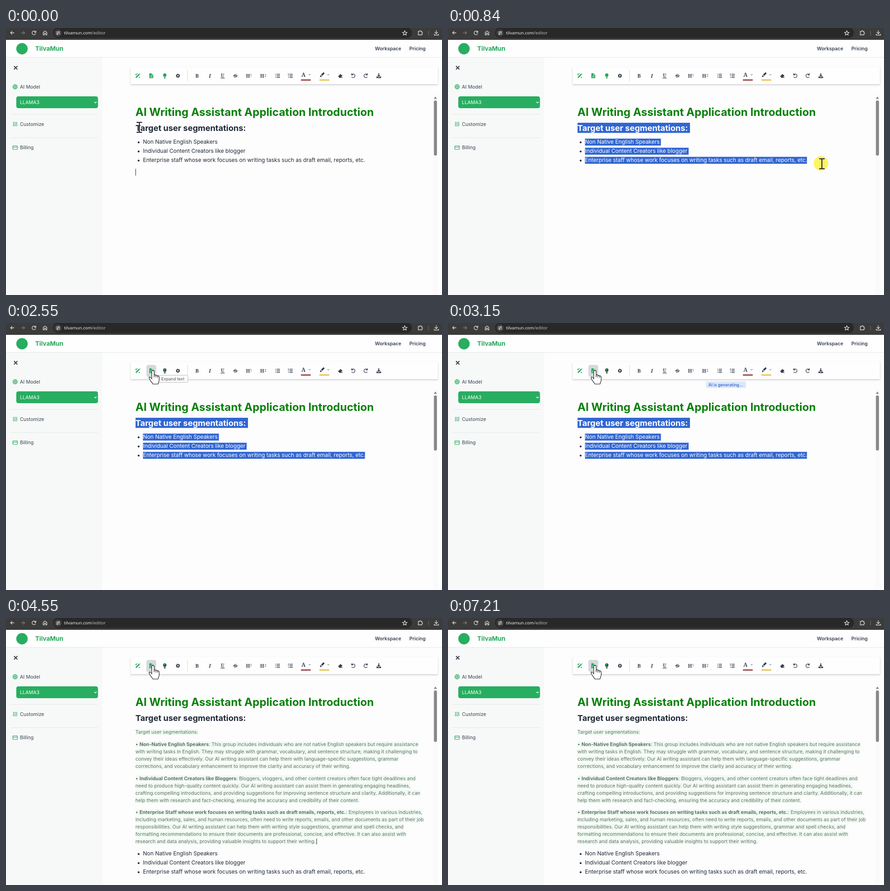
An HTML page for the animation above (7560 ms loop, 955 by 586 pixels).

```html
<!DOCTYPE html>
<html lang="en">
<head>
<meta charset="utf-8">
<title>Editor</title>
<style>
  html, body { margin: 0; width: 100%; height: 100%; overflow: hidden; background: #fdfdfd; }
  svg { display: block; font-family: Inter, sans-serif; }
  text { white-space: pre; }
  .line { fill: none; stroke: #374151; stroke-width: 1.3; }
  .light { fill: none; stroke: #d6d6d6; stroke-width: 1.3; }
  .green { fill: none; stroke: #27a85c; stroke-width: 1.2; }
  .serif { font: bold 11px "Noto Serif", serif; fill: #374151; text-anchor: middle; }
</style>
</head>
<body>
<svg id="stage" width="955" height="586" viewBox="0 0 955 586">
  <!-- browser bar -->
  <rect width="955" height="26" fill="#3b3b3b"/>
  <rect x="103" y="-1" width="786" height="23" rx="11.5" fill="#282828"/>
  <circle cx="114" cy="11" r="8" fill="#3f3f3f"/>
  <g class="light">
    <path d="M18 10.5H10M13.5 7L10 10.5L13.5 14"/>
    <path d="M33 10.5H41M37.5 7L41 10.5L37.5 14" style="stroke:#777"/>
    <path d="M64.5 8.5A4 4 0 1 0 65 12M65.500 6V9.500H62"/>
    <path d="M81.5 9.5L85.5 6.5L89.5 9.5V15H87V11.5H84V15H81.5Z"/>
    <path d="M110 9H114M116 13H118.5M112 13H110"/><circle cx="116" cy="9" r="1.3"/><circle cx="113" cy="13" r="1.3"/>
    <path d="M873.5 6L874.9 9.3L878.5 9.6L875.8 12L876.6 15.5L873.5 13.6L870.4 15.5L871.2 12L868.5 9.6L872.1 9.3Z"/>
    <path d="M903 7.5H906A1.5 1.5 0 0 1 909 7.5H911V10A1.5 1.5 0 0 1 911 13V15H903V12.5A1.5 1.5 0 0 0 903 10Z"/>
    <path d="M925.5 6V16" style="stroke:#666"/>
    <path d="M942.5 5V12M939 9L942.5 12.5L946 9M938 13V15.5H947.5V13"/>
  </g>
  <!-- header and sidebar -->
  <rect y="26" width="955" height="38.5" fill="#fefefe"/>
  <rect y="65" width="211" height="521" fill="#f7f9f8"/>
  <path d="M0 64.5H955M10 189.5H201M10 240.5H201" stroke="#e4e7e8"/>
  <circle cx="35" cy="45.5" r="12.5" fill="#27ae60"/>
  <path class="line" d="M17.5 83.5L25 91M25 83.5L17.5 91" style="stroke-width:2"/>
  <g class="green">
    <rect x="16.5" y="125.5" width="7" height="7" rx="1"/><rect x="18.8" y="127.8" width="2.4" height="2.4"/>
    <path d="M18 123.5V125M20 123.5V125M22 123.5V125M18 133V134.5M20 133V134.5M22 133V134.5M14.5 127H16M14.5 129H16M14.5 131H16M24 127H25.5M24 129H25.5M24 131H25.5"/>
    <path d="M16.5 206V211M16.5 213.5V216M20 206V208M20 210.5V216M23.5 206V212M23.5 214.5V216M14.8 212.5H18.2M18.3 209H21.7M21.8 213H25.2"/>
    <rect x="15" y="258.5" width="10" height="8" rx="1"/><path d="M15 261.5H25"/>
  </g>
  <rect x="22.5" y="150" width="179" height="26" rx="4.5" fill="#27ae60"/>
  <path d="M193.5 162L196 164.5L198.5 162" fill="none" stroke="#fff" stroke-width="1.3"/>
  <!-- toolbar -->
  <rect x="273" y="86" width="673" height="37.5" fill="#fefefe" style="filter:drop-shadow(0 1px 1px #0003) drop-shadow(0 2px 2px #0001)"/>
  <rect id="hover" x="307.5" y="92" width="21.5" height="26" rx="4" fill="#d5d9dd"/>
  <path d="M397.5 92V118" stroke="#d5d8dc"/>
  <path d="M284.5 109L292 101.5" stroke="#27a85c" stroke-width="2.6"/>
  <path class="green" d="M285 100V104M283 102H287M292 107V110M290.5 108.5H293.5M287.5 99V101M294 100L292.5 101.5"/>
  <path d="M314 99.5H319.5L322.5 102.5V110H314Z" fill="#27a85c"/>
  <path d="M316 105H320.5M316 107.5H320.5M319.5 99.5V102.5H322.5" stroke="#fff" stroke-width=".9" fill="none"/>
  <g id="bulb" fill="#27a85c"><path d="M345.5 107C343 104 344 99.5 347.8 99.5S352.5 104 350 107Z"/><rect x="345.8" y="108" width="4" height="2.5" rx="1"/></g>
  <circle cx="347.5" cy="102.5" r="1.8" fill="#27a85c"/>
  <circle cx="376.5" cy="104.8" r="2.6" fill="none" stroke="#374151" stroke-width="2.1"/>
  <circle cx="376.5" cy="104.8" r="3.9" fill="none" stroke="#374151" stroke-width="1.3" stroke-dasharray="2.05 2.034"/>
  <g class="serif">
    <text x="418.5" y="109">B</text><text x="446.5" y="109" font-style="italic">I</text>
    <text x="474.5" y="108" font-size="10">U</text><text x="502.5" y="109">S</text>
    <text x="530" y="109">H</text><text x="561" y="109">H</text>
    <text x="651.5" y="107" style="font-size:12px">A</text>
  </g>
  <g class="line">
    <path d="M470 109.8H479M497.5 105H507.5"/>
    <path d="M593 101.5H600M593 105H600M593 108.5H600M621 101.5H628M621 105H628M621 108.5H628"/>
    <path d="M590 101.5H591.5M590 105H591.5M590 108.5H591.5M618.5 100V103M618 105H619.5M618 108.5H619.5"/>
    <path d="M663 101.5L665 103.5L667 101.5M704 101.5L706 103.5L708 101.5" style="stroke-width:1"/>
    <path d="M757 99.5V103H760.5M757.2 102.5A4 4 0 1 1 757 107"/>
    <path d="M791.5 99.5V103H788M791.3 102.5A4 4 0 1 0 791.5 107"/>
    <path d="M816.5 99.5V105" style="stroke-width:2.2"/>
    <path d="M730 108.7H737"/>
  </g>
  <path d="M813 104H820L816.5 107.5ZM811.5 106.5H814L816.5 109L819 106.5H821.5V110H811.5ZM727.5 106L732.5 101L737 104.5L733 109H730ZM687.5 107.5L689 103L692 106L690 107.5ZM690 102L695.5 97L698 99.5L693 105Z" fill="#374151"/>
  <rect x="646" y="113" width="21.5" height="2.3" fill="#8b1c24"/>
  <rect x="686.5" y="113" width="21.5" height="2.3" fill="#e3b52c"/>
  <!-- scrollbar -->
  <rect x="936" y="146" width="9.5" height="440" fill="#fafafa"/>
  <path d="M937 155.5L940.5 150.5L944 155.5Z" fill="#868686"/>
  <rect id="thumb" x="937.3" y="159" width="6.6" rx="3.3" fill="#888"/>

  <g id="labels"></g>
  <g id="bullets"></g>
  <g id="selection"></g>
  <g id="answer"></g>
  <rect id="caret" width="1" fill="#222"/>
  <g id="pill">
    <rect x="565.5" y="128.5" width="87" height="14" rx="1.5" fill="#d9e8fc"/>
  </g>
  <g id="tip">
    <rect x="332.5" y="114.5" width="66" height="16" rx="2" fill="#fafafa" stroke="#bbb"/>
  </g>
  <circle id="press" r="16" fill="#fdf764" style="mix-blend-mode:multiply"/>
  <g id="beam" fill="none">
    <path id="beamPath" d="M-6 -11H-2Q0 -11 0 -9V9Q0 11 -2 11H-6M6 -11H2Q0 -11 0 -9M0 9Q0 11 2 11H6" stroke="#1a1a1a" stroke-width="2"/>
  </g>
  <path id="hand" d="M-2.7 2.5A2.6 2.6 0 0 1 2.5 2.5V10Q5 8.8 6.2 11Q9 10 10 12.2Q13.3 11.5 13.5 15V21C13.5 25 11.5 26 11 30H-.5C-1 27.5 -4 25.5 -6 21.5L-8.4 17.5C-9.5 15 -6.5 13.5 -4.7 16L-2.7 18.5ZM2.5 10V15M6.2 11V15.5M10 12.2V16" fill="#fff" stroke="#111" stroke-width="1.1"/>
</svg>
<script>
const LOOP = 7560, STEP = 70, DONE = 4550;
const NS = 'http://www.w3.org/2000/svg';
const $ = id => document.getElementById(id);
const clamp = (v, lo = 0, hi = 1) => Math.max(lo, Math.min(hi, v));
const show = (id, on) => $(id).style.display = on ? '' : 'none';

function add(parent, tag, attrs) {
  const el = document.createElementNS(NS, tag);
  for (const key in attrs) el.setAttribute(key, attrs[key]);
  return parent.appendChild(el);
}
function write(parent, x, y, size, content, fill = '#374151', weight = 400, more = {}) {
  const el = add(parent, 'text', { x, y, fill, 'font-size': size, 'font-weight': weight, ...more });
  el.innerHTML = content;
  return el;
}

const labels = $('labels');
write(labels, 127, 14.2, 9.6, 'tilvamun.com<tspan fill="#c4c4c4">/editor</tspan>', '#fff', 400, { 'font-family': 'Open Sans, sans-serif' });
write(labels, 64, 50, 13.5, 'TilvaMun', '#27a85c', 700);
write(labels, 808, 49.3, 10.5, 'Workspace', '#374151', 600);
write(labels, 883.5, 49.3, 10.5, 'Pricing', '#374151', 600);
write(labels, 30.5, 132.7, 10.6, 'AI Model');
write(labels, 30.5, 166.8, 10.6, 'LLAMA3', '#fff');
write(labels, 30.5, 214.8, 10.6, 'Customize');
write(labels, 30.5, 266.2, 10.6, 'Billing');
write(labels, 535, 107, 7, '1');
write(labels, 566, 107, 7, '2');
write(labels, 283.5, 193.2, 24, 'AI Writing Assistant Application Introduction', '#0a800a', 700);
write($('pill'), 570.5, 138.7, 9, 'AI is generating...', '#3359cf', 500, { id: 'status' });
write($('tip'), 365.5, 125.8, 9, 'Expand text', '#555', 400, { 'text-anchor': 'middle' });

// Selectable lines: a clipped inverted copy lies over each one.
const lines = [
  { text: 'Target user segmentations:', x: 283.5, y: 225.5, size: 18, weight: 700, top: 208, height: 22.5, tail: 4.5 },
  ...['Non Native English Speakers', 'Individual Content Creators like blogger',
    'Enterprise staff whose work focuses on writing tasks such as draft email, reports, etc.']
    .map((text, i) => ({ text, x: 300, y: 254.3 + 20 * i, size: 12, weight: 400, top: 242.5 + 20 * i, height: 15.5, tail: i < 2 ? 3 : 0 }))
];
lines.forEach((line, i) => {
  const parent = i ? $('bullets') : labels;
  const base = write(parent, line.x, line.y, line.size, line.text, '#1f2937', line.weight);
  if (i) add(parent, 'circle', { cx: 290.5, cy: line.y - 3.3, r: 2.1, fill: '#1f2937' });
  line.width = base.getComputedTextLength() + line.tail;
  line.clip = add($('selection'), 'svg', { x: line.x, y: line.top, width: 0, height: line.height });
  add(line.clip, 'rect', { width: '100%', height: '100%', fill: '#3166d2' });
  write(line.clip, 0, line.y - line.top, line.size, line.text, '#fff', line.weight);
});

const bold = s => `<tspan font-weight="700">${s}</tspan>`;
const paragraphs = [
  [254.3, 'Target user segmentations:'],
  [280.8, `• ${bold('Non-Native English Speakers')}: This group includes individuals who are not native English speakers but require assistance`,
    'with writing tasks in English. They may struggle with grammar, vocabulary, and sentence structure, making it challenging to',
    'convey their ideas effectively. Our AI writing assistant can help them with language-specific suggestions, grammar',
    'corrections, and vocabulary enhancement to improve the clarity and accuracy of their writing.'],
  [355.6, `• ${bold('Individual Content Creators like Bloggers')}: Bloggers, vloggers, and other content creators often face tight deadlines and`,
    'need to produce high-quality content quickly. Our AI writing assistant can assist them in generating engaging headlines,',
    'crafting compelling introductions, and providing suggestions for improving sentence structure and clarity. Additionally, it can',
    'help them with research and fact-checking, ensuring the accuracy and credibility of their content.'],
  [430.4, `• ${bold('Enterprise Staff whose work focuses on writing tasks such as draft emails, reports, etc.')}: Employees in various industries,`,
    'including marketing, sales, and human resources, often need to write reports, emails, and other documents as part of their job',
    'responsibilities. Our AI writing assistant can help them with writing style suggestions, grammar and spell checks, and',
    'formatting recommendations to ensure their documents are professional, concise, and effective. It can also assist with',
    'research and data analysis, providing valuable insights to support their writing.']
];
for (const [y, ...rows] of paragraphs) rows.forEach((row, i) => {
  const back = add($('answer'), 'rect', { x: 283.5, y: y + 16 * i - 10.3, height: 13, fill: '#effbf2' });
  const el = write($('answer'), 283.5, y + 16 * i, 10.63, row, '#666e69');
  back.setAttribute('width', el.getComputedTextLength());
});

const halo = $('beam').insertBefore($('beamPath').cloneNode(), $('beamPath'));
halo.removeAttribute('id');
halo.setAttribute('stroke', '#fff8');
halo.setAttribute('stroke-width', 3.5);

// Pointer stops, one per step
const drag = [[287, 217], [348, 220], [450, 229], [550, 245], [650, 264], [740, 282], [798, 294], [817, 297]];
const settle = [[310, 95], [309, 97], [312, 100], [318, 103], [322, 104]];
const along = (points, i) => {
  i = clamp(i, 0, points.length - 1);
  const a = points[Math.floor(i)], b = points[Math.ceil(i)];
  return a.map((v, k) => v + (b[k] - v) * (i % 1));
};
const steps = (t, start) => Math.floor((t - start) / STEP);

function pointer(t) {
  if (t < 80) return [292, 218];
  if (t < 350) return [289, 218];
  if (t < 1170) return along(drag, steps(t, 350)).map((v, k) => v + 2 - k);
  if (t >= 1730) return along(settle, steps(t, 1730));
  const u = steps(t, 1170) / 8, e = u * u * (3 - 2 * u);
  return [819 - 509 * e, 298 - 203 * e];
}

function draw(t) {
  const done = t >= DONE;
  const [x, y] = pointer(t), overBar = t > 1170 && y < 124;
  show('beam', !overBar);
  show('hand', overBar);
  $(overBar ? 'hand' : 'beam').setAttribute('transform', `translate(${x} ${y})`);

  const dragging = t >= 350 && t < 1170;
  show('press', dragging || t >= 2880 && t < 3020);
  const [px, py] = dragging ? along(drag, steps(t, 350)) : [322, 104];
  $('press').setAttribute('cx', px);
  $('press').setAttribute('cy', py);

  // The selection trails the pointer by half a step.
  show('selection', t >= 350 && !done);
  const [sx, sy] = along(drag, steps(t, 350) - 0.5);
  lines.forEach((line, i) => {
    const top = i ? 220 + 20 * i : 0, bottom = 240 + 20 * i;
    const width = sy < top ? 0 : sy >= bottom ? line.width : clamp(sx - line.x, 0, line.width);
    line.clip.setAttribute('width', width);
  });

  $('hover').setAttribute('opacity', clamp((t - 1590) / 280));
  $('bulb').setAttribute('fill', t >= 1660 ? '#2f473b' : '#27a85c');
  show('tip', t >= 2550 && t < 2880);
  show('pill', t >= 3020 && !done);
  $('status').setAttribute('opacity', 0.78 + 0.22 * Math.cos((t - 3020) / 1000 * Math.PI));

  show('answer', done);
  $('bullets').setAttribute('transform', `translate(0 ${done ? 267 : 0})`);
  $('thumb').setAttribute('height', done ? 113 : 121);
  const caret = done ? { x: 680, y: 484, height: 13 } : { x: 283.5, y: 309, height: 15 };
  for (const key in caret) $('caret').setAttribute(key, caret[key]);
  show('caret', done ? Math.floor((t - DONE) / 532) % 2 === 0 : t < 80);
}

(function frame() {
  draw(performance.now() % LOOP);
  requestAnimationFrame(frame);
})();
</script>
</body>
</html>
```
